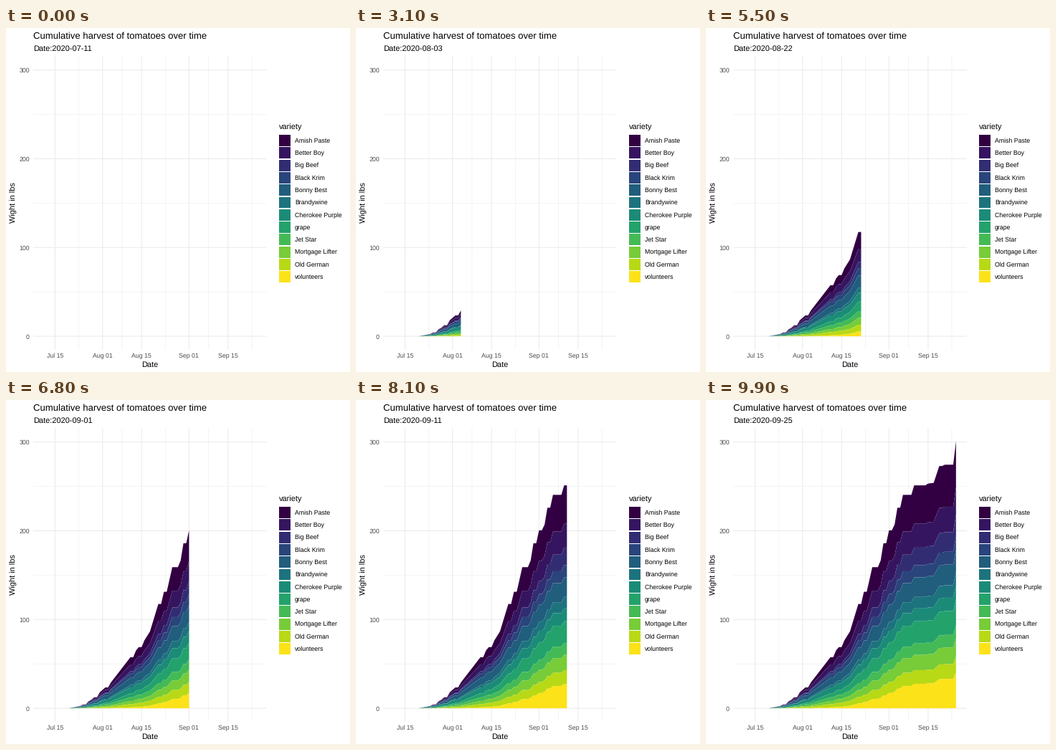
A matplotlib script for the animation above (10000 ms loop, 480x480 px).

```python
import numpy as np
import matplotlib.pyplot as plt
from matplotlib.animation import FuncAnimation
from matplotlib.patches import Polygon, Rectangle

plt.rcParams["font.family"] = "Liberation Sans"
plt.rcParams["text.hinting"] = "none"

SIZE, DPI = 480, 72
FRAMES, STEP = 100, 100
LAST_DAY = 76
LEFT, RIGHT, TOP, BOTTOM = 38.1, 363.7, 38.9, 448.6

# Variety: final weight, growth exponent (above 1 means it ripens late)
VARIETIES = {
    "Amish Paste": (52, 1.05), "Better Boy": (30.5, 0.75),
    "Big Beef": (24.9, 1.3), "Black Krim": (15.2, 0.62),
    "Bonny Best": (24.5, 0.6), "Brandywine": (15.4, 1.0),
    "Cherokee Purple": (15.6, 0.45), "grape": (29.5, 1.05),
    "Jet Star": (15, 0.7), "Mortgage Lifter": (20.5, 1.0),
    "Old German": (18, 0.9), "volunteers": (40, 2.1)}

# Days since July 11 and the weight picked by then
TREND = [(9, 0), (13, 2.5), (17, 9.5), (24, 29), (31, 57.5), (36, 76.5),
         (38, 86.5), (41, 117.5), (45, 145), (46, 159), (49, 166.5),
         (50, 186), (52, 200.5), (54, 207), (55, 226), (57, 240.5),
         (61, 251.2), (68, 254), (70, 273), (72, 274.5), (76, 301)]
REST_DAYS = [15, 19, 23, 32, 35, 42, 44, 47, 48, 51, 53, 56,
             *range(58, 61), *range(62, 66), 71, *range(73, 76)]


def stack_edges(days):
    """Upper edge of every variety per day, then the zero line."""
    picked = np.where(np.isin(days, REST_DAYS), 0, days)
    total = np.interp(np.maximum.accumulate(picked), *zip(*TREND))
    part = total / total[-1]
    layers = np.array([w * part ** p for w, p in VARIETIES.values()])
    layers *= total / np.maximum(layers.sum(axis=0), 1e-9)
    tops = np.cumsum(layers[::-1], axis=0)[::-1]
    return np.vstack([tops, np.zeros(len(days))])


def tone(v):
    """Viridis as it looks on a screen with gamma 1.8."""
    r, g, b = np.array(plt.get_cmap("viridis")(v)[:3]) ** 2.2
    return tuple(np.array([0.975 * r + 0.025 * g, g, b]) ** (1 / 1.8))


DAYS = np.arange(LAST_DAY + 1)
EDGES = stack_edges(DAYS)
DAY_FRAMES = np.round(DAYS * (FRAMES - 1) / LAST_DAY)
COLORS = [tone(v) for v in np.linspace(0, 1, len(VARIETIES))]


def px(day):
    return 52.9 + 3.894 * day


def py(lbs):
    return 430.1 - 1.238 * lbs


fig = plt.figure(figsize=(SIZE / DPI, SIZE / DPI), dpi=DPI, facecolor="white")
ax = fig.add_axes([0, 0, 1, 1])
ax.set_xlim(0, SIZE)
ax.set_ylim(SIZE, 0)
ax.axis("off")


def label(x, y, s, size, color="black", **kw):
    return ax.text(x, y, s, fontsize=size, color=color, va="baseline", **kw)


def grid(xs, ys, width):
    style = dict(color="#EBEBEB", lw=width, solid_capstyle="butt",
                 snap=False, zorder=1)
    for y in ys:
        ax.plot([LEFT, RIGHT], [y, y], **style)
    for x in xs:
        ax.plot([x, x], [TOP, BOTTOM], **style)


ticks = {4: "Jul 15", 21: "Aug 01", 35: "Aug 15", 52: "Sep 01", 66: "Sep 15"}
weights = range(0, 301, 100)
grid([px(d) for d in (12.5, 28, 43.5, 59, 74.5)],
     [py(v) for v in range(50, 300, 100)], 0.53)
grid([px(d) for d in ticks], [py(v) for v in weights], 1.07)

GRAY = "#4D4D4D"
for d, name in ticks.items():
    label(px(d), 460.2, name, 8.8, GRAY, ha="center")
for v in weights:
    label(33, py(v) + 3.6, str(v), 8.8, GRAY, ha="right")

label(38.1, 15, "Cumulative harvest of tomatoes over time", 13.14)
date = label(38.1, 32, "", 11)
label(200.6, 473, "Date", 11, ha="center")
label(13.9, 243.8, "Wight in lbs", 11, ha="center", rotation=90,
      rotation_mode="anchor")

label(380.6, 142, "variety", 11)
for i, (name, color) in enumerate(zip(VARIETIES, COLORS)):
    y = 157.1 + 17.28 * i
    ax.add_patch(Rectangle((380.9, y - 7.9), 15.9, 15.8, fc=color, ec="none"))
    label(403, y + 2.9, name, 8.8)

areas = [Polygon(np.zeros((3, 2)), fc=c, ec="none", lw=0, zorder=3)
         for c in COLORS]
for area in areas:
    ax.add_patch(area)


def date_text(day):
    n, month = 11 + day, 7
    while n > 31:
        n, month = n - 31, month + 1
    return f"Date:2020-{month:02d}-{n:02d}"


def update(frame):
    date.set_text(date_text(LAST_DAY * frame // (FRAMES - 1)))
    # Each day falls on a whole frame; the front glides in between
    front = np.interp(frame, DAY_FRAMES, DAYS)
    t = np.append(DAYS[DAYS < front], front)
    x = px(t)
    lines = [py(np.interp(t, DAYS, e)) for e in EDGES]
    for area, upper, lower in zip(areas, lines, lines[1:]):
        area.set_xy(np.column_stack([np.append(x, x[::-1]),
                                     np.append(upper, lower[::-1])]))
    return [date, *areas]


def reset():
    return update(0)


anim = FuncAnimation(fig, update, frames=FRAMES, init_func=reset,
                     interval=STEP, repeat=True, repeat_delay=0)
plt.show()
```
